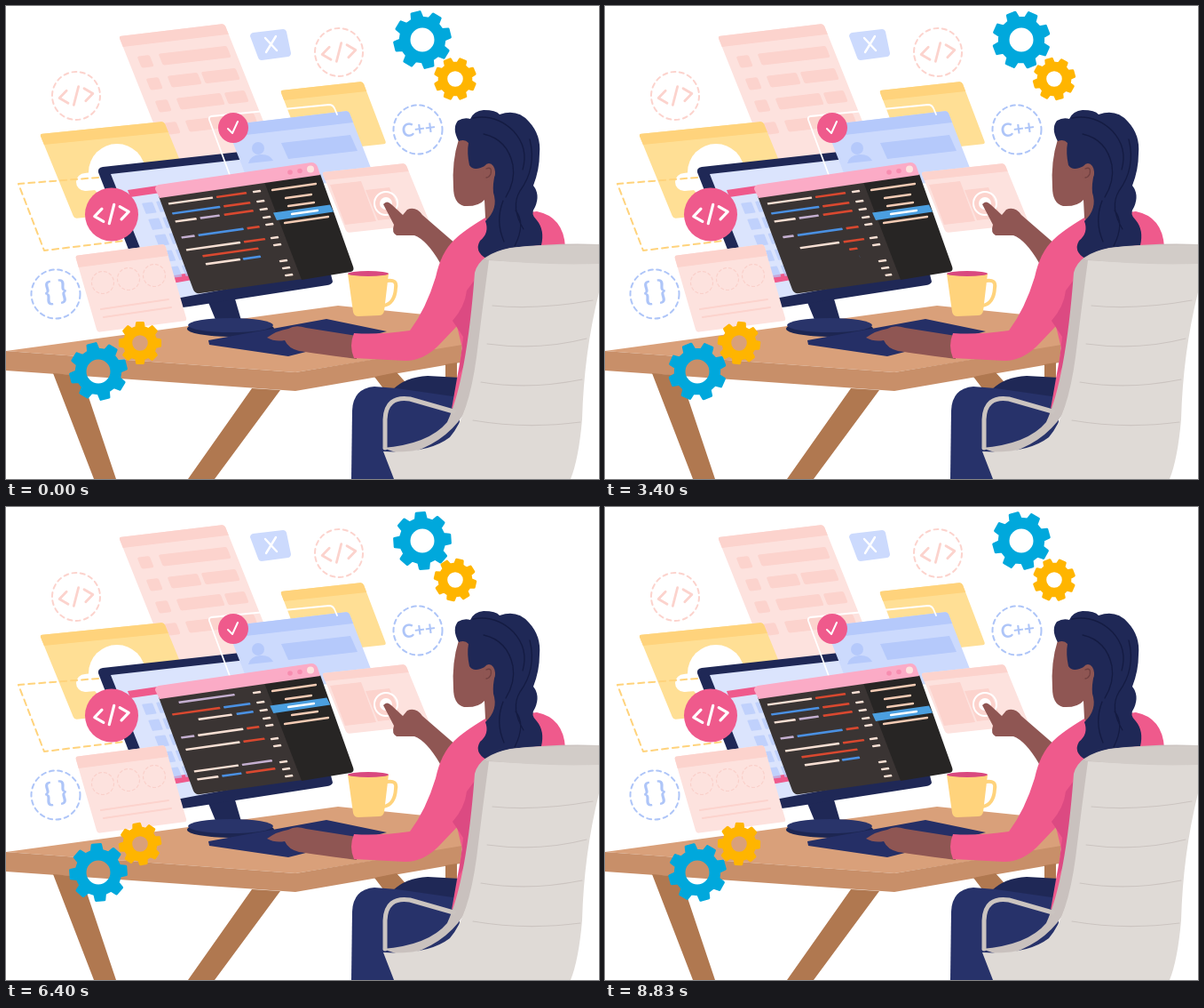
An HTML page with a canvas that plays this animation: 668 px wide and 532 px high, repeating every 8.86 s.

```html
<!DOCTYPE html>
<html lang="en">
<head>
<meta charset="utf-8">
<title>Developer at work</title>
<style>
html, body { margin: 0; width: 100%; height: 100%; overflow: hidden; background: #fff; }
canvas { display: block; width: 668px; height: 532px; }
</style>
</head>
<body>
<canvas id="stage" width="668" height="532"></canvas>
<script>
const W = 668, H = 532, LOOP = 8860, HALF = LOOP / 4;
const navy = '#1f2856', pink = '#ef5a8c', skin = '#8f5653';
const blush = '#fde2de', rose = '#fcd3cd', sky = '#ccdafd', azure = '#b5c9fb';
const butter = '#ffdf95', gold = '#ffd37c', cream = '#f7dfd3', red = '#d9482f', blue = '#4a90e2', lav = '#c4afd0';

const view = document.getElementById('stage').getContext('2d');
const back = document.createElement('canvas');
back.width = W;
back.height = H;
let c = back.getContext('2d');

function fill(color, d) {
  c.fillStyle = color;
  c.fill(new Path2D(d));
}
function line(color, width, d, dash = []) {
  c.strokeStyle = color;
  c.lineWidth = width;
  c.lineCap = c.lineJoin = 'round';
  c.setLineDash(dash);
  c.stroke(new Path2D(d));
  c.setLineDash([]);
}
function disc(color, x, y, r, ry = r) {
  c.fillStyle = color;
  c.beginPath();
  c.ellipse(x, y, r, ry, 0, 0, 7);
  c.fill();
}
function ring(color, x, y, r, width, dash = []) {
  c.strokeStyle = color;
  c.lineWidth = width;
  c.lineCap = 'round';
  c.setLineDash(dash);
  c.beginPath();
  c.arc(x, y, r, 0, Math.PI * 2);
  c.stroke();
  c.setLineDash([]);
}
// Runs a drawing in slanted coordinates with its corner at x, y
function slanted(x, y, rise, lean, draw) {
  c.save();
  c.transform(1, rise, lean, 1, x, y);
  draw();
  c.restore();
}
function box(color, x, y, w, h, r = 0) {
  c.fillStyle = color;
  c.beginPath();
  c.roundRect(x, y, w, h, r);
  c.fill();
}
function pane(x, y, rise, lean, w, h, body, head, headH, inner) {
  slanted(x, y, rise, lean, () => {
    box(body, 0, 0, w, h, 3);
    box(head, 0, 0, w, headH, [3, 3, 0, 0]);
    if (inner) inner();
  });
}
function tag(color, x, y, s, width) {
  c.save();
  c.translate(x, y);
  c.rotate(-0.13);
  c.scale(s, s);
  line(color, width / s, 'M-10-7L-19 0L-10 7M10-7L19 0L10 7M4-10L-4 10');
  c.restore();
}
function label(text, x, y, size, color) {
  c.save();
  c.translate(x, y);
  c.rotate(-0.13);
  c.font = `bold ${size}px Lato, sans-serif`;
  c.textAlign = 'center';
  c.textBaseline = 'middle';
  c.fillStyle = color;
  c.fillText(text, 0, 0);
  c.restore();
}

function drawPanes() {
  pane(127, 34, -0.119, 0.4, 119, 150, blush, rose, 12, () => {
    for (let i = 0; i < 4; i++) {
      const y = 24 + i * 25;
      box(rose, 11, y, 14, 13, 2);
      if (i % 3 === 0) box(rose, 35, y, 77, 13, 2);
      else {
        const w = i === 1 ? 34 : 50;
        box(rose, 35, y, w, 13, 2);
        box(rose, 39 + w, y, 73 - w, 13, 2);
      }
    }
  });
  fill(sky, 'M278 30L312 26Q315 26 316 29L321 53Q321 56 318 57L288 61Q285 61 284 58L275 34Q275 31 278 30Z');
  line('#fff', 2.4, 'M292 36L305 50M304 34L293 52');
  pane(38, 144, -0.1, 0.41, 140, 95, butter, gold, 12);
  disc('#fff', 125, 187, 32);
  disc('#fff', 89, 198, 10);
  fill('#fff', 'M89 188L140 181L152 203L89 208Z');
  line(gold, 2, 'M128 191L14 200L43 275L150 262', [7, 5]);
  pane(309, 95, -0.107, 0.38, 93, 70, butter, gold, 11);
}

function drawMonitor() {
  fill('#d9a07a', 'M0 388L374 337L520 352L514 382L326 412Z');
  fill('#c88f69', 'M0 388L326 412L514 381L512 401L326 433L0 410Z');
  fill('#b07850', 'M53 413L85 416L124 532L99 532ZM277 430L309 432L235 532L205 532ZM415 417L440 412L456 430L428 434ZM495 403L508 401L508 422L495 418Z');
  fill(navy, 'M227 331L257 326L266 357L239 360Z');
  disc('#1d2652', 253, 363, 49, 9);
  disc('#29346a', 253, 359, 48, 8);
  fill(navy, 'M109 181L300 160L366 302L368 310Q367 313 362 314L207 338Q166 344 162 335L104 187Q103 182 109 181Z');
  fill('#dbe4fd', 'M118 189L280 171L345 300L197 328L174 330Z');
  fill(pink, 'M137 207L185 200L188 208L140 215ZM184 304L207 300L210 308L187 312Z');
  c.globalAlpha = 0.7;
  slanted(153, 222, -0.13, 0.4, () => {
    for (let i = 0; i < 5; i++) {
      box(azure, 0, i * 18, 12, 12, 1);
      box(azure, 16, i * 18, 26, 12, 1);
    }
  });
  c.globalAlpha = 1;
  pane(248, 134, -0.116, 0.39, 138, 75, sky, azure, 13);
  disc(azure, 284, 160, 7);
  fill(azure, 'M273 177Q275 168 286 167Q297 166 301 174Z');
  fill(azure, 'M310 154L388 145L396 163L318 172Z');
  line('#fff', 1.8, 'M252 190L229 128Q228 125 231 124L364 111Q368 111 370 115L373 122');
  pane(356, 187, -0.107, 0.41, 94, 68, blush, rose, 9);
  fill(rose, 'M365 201L400 197L417 242L382 246ZM405 207L432 204L446 238L419 241Z');
  ring('#fff', 428, 222, 13, 2);
  disc('#fff', 428, 222, 7);
}

function drawEditor() {
  fill('#3a3433', 'M172 214L292 197L334 307L219 323Q213 324 211 319Z');
  fill('#272524', 'M291 198L354 189L391 293Q393 298 388 299L333 308Z');
  fill('#fbabc6', 'M172 201L344 176Q349 176 351 181L354 190L173 216L168 206Q168 202 172 201Z');
  disc('#f78db0', 320, 187, 2.8);
  disc('#f78db0', 331, 185.5, 2.8);
  disc('#fde3df', 343, 183.5, 4);
}

function drawBadges() {
  for (const [x, y] of [[79, 101], [375, 52]]) {
    ring(rose, x, y, 27, 2, [5, 4.4]);
    tag(rose, x, y, 1, 2.8);
  }
  for (const [x, y] of [[464, 139], [56, 324]]) ring('#aec5f8', x, y, 27.5, 2, [5, 4.4]);
  label('C++', 465, 139, 21, '#aec5f8');
  label('{ }', 56, 322, 30, '#aec5f8');
  disc(pink, 119, 234.5, 30);
  tag('#fff', 119, 234, 1.02, 3.2);
  disc(pink, 256, 137, 17);
  line('#fff', 2, 'M250 138L255 143L261 130');
  pane(78, 281, -0.129, 0.29, 101, 86, blush, rose, 13);
  for (const [x, y] of [[109, 311], [138, 307], [167, 303]]) ring('#fad0ca', x, y, 12.5, 1.2, [3, 3]);
  line(rose, 2, 'M107 341L183 330M110 350L186 339');
}

function drawPerson() {
  fill('#252f66', 'M228 376L361 352L429 366L318 394L229 381Z');
  line(gold, 4, 'M429 309Q441 307 439 317Q438 335 425 337');
  fill(gold, 'M385 301L431 301L426 343Q425 348 420 348L397 349Q392 349 391 344Z');
  disc('#d9487f', 408, 301, 23, 3);
  // arms and face
  fill(skin, 'M425 223Q429 218 434 223L447 235L452 229Q462 225 469 235L506 267L489 289Q474 263 460 258L440 258Q434 255 437 246Z');
  fill(skin, 'M294 373Q305 365 318 363Q326 358 338 362L395 371L395 397Q350 391 330 388Q318 385 314 376Q303 378 294 373Z');
  // legs
  fill(navy, 'M435 432Q450 417 475 416L512 418L506 450L440 445Z');
  fill('#27326a', 'M389 532L390 455Q391 430 415 428L440 430L510 440L512 500L437 532Z');
  // top
  fill(pink, 'M540 238Q515 253 505 263Q490 277 484 305Q473 341 455 365Q420 370 392 368Q386 382 392 396L450 399Q470 399 487 382L508 360L514 385L502 453L520 440L542 284L630 271Q628 237 598 231Z');
  fill('#dc4a82', 'M519 320Q517 338 503 354L515 372L510 415L525 390L534 300Z');
  fill(skin, 'M510 150Q502 175 504 204Q504 222 516 225Q532 226 539 218L540 238Q548 252 558 238L560 170L540 145Z');
  fill(navy, 'M510 152Q502 138 509 129Q516 125 523 127Q527 118 538 117Q552 117 556 122Q576 115 589 130Q603 145 601 166Q601 184 594 202Q602 212 596 226Q590 234 598 241Q607 252 603 269L566 273L541 284Q527 276 534 264Q545 255 540 242Q555 228 549 210Q548 201 551 188Q549 177 541 179Q527 187 522 179Q519 165 521 154Q517 149 510 152Z');
  disc(skin, 544, 187, 7, 10);
  line('#6f3f40', 1.3, 'M541 183Q548 180 546 189Q544 193 541 193');
  line('#141b42', 1.3, 'M526 126Q552 121 572 141Q589 160 582 184M538 144Q565 150 571 179Q574 197 563 215M590 150Q598 182 579 208Q568 226 583 251M560 219Q551 242 561 265M574 230Q586 244 573 270');
}

function drawChair() {
  fill('#c9c1be', 'M528 300Q533 279 568 272Q620 266 668 268L668 300L548 310Q536 410 515 460Q493 493 448 505L424 497Q476 493 497 468Q519 420 528 300Z');
  fill('#dfdad6', 'M544 286Q600 290 668 287L668 322Q651 390 649 465Q645 510 636 532L437 532L425 501Q475 504 500 485Q521 461 530 395Q538 330 544 286Z');
  fill('#d2ccc8', 'M540 285Q553 271 595 270L668 268L668 290Q600 292 540 285Z');
  line('#cbc4c0', 1.2, 'M548 337Q600 342 661 331M542 380Q600 388 654 374M535 423Q590 432 649 420M526 466Q585 476 647 468');
  line('#cbc4c0', 5, 'M504 456L455 442Q428 438 427 465L427 497');
}

// Each row: depth, extra delay, then colour, left and right of its parts, rightmost part first
const rowsA = [
  [0, 0, red, 54, 88, cream, 0, 50],
  [11, 0, red, 58, 88, blue, 0, 54],
  [20, 0, red, 55, 88, lav, 28, 50, cream, 0, 24],
  [38, 0, red, 74, 88, blue, 19, 70, lav, 0, 15],
  [52, 0, red, 65, 89, cream, 0, 61],
  [61, 110, red, 15, 78],
  [70, 110, blue, 57, 77, cream, 15, 54]
];
const rowsB = [
  [-1, 0, lav, 12, 75],
  [11, 0, blue, 58, 88, red, 0, 54],
  [20, 0, blue, 69, 88, cream, 26, 64],
  [37, 0, red, 74, 88, cream, 19, 70, lav, 0, 15],
  [50.5, 0, red, 65, 89, cream, 0, 61],
  [75, 0, lav, 54, 88, cream, 0, 50],
  [84, 0, red, 55, 88, blue, 28, 50, cream, 0, 24]
];
const marks = [0, 11, 20, 29, 37, 52, 60, 78, 86, 94];

const clamp = x => Math.max(0, Math.min(1, x));
const ease = x => (1 - Math.cos(Math.PI * clamp(x))) / 2;

// Parts grow from their right end to the left
function dash(color, l, r, v, p) {
  if (p > 0) box(color, r - (r - l) * p, v - 1.2, (r - l) * p, 2.4, 0.6);
}
function drawCode(rows, shift, s) {
  for (const v of marks) dash(cream, 95, 104, v + shift, clamp((s - 250 - v * 5.5) / 90));
  for (const [v, lag, ...parts] of rows) {
    for (let i = 0; i < parts.length; i += 3) {
      const start = 334 + v * 5.5 + lag + i * 20;
      dash(parts[i], parts[i + 1], parts[i + 2], v + shift, ease((s - start) / 250));
    }
  }
}

function drawScreen(t) {
  const q = (t - 340 + LOOP) % (HALF * 2);
  const toB = q < HALF, s = q % HALF;
  const gap = 115, scroll = ease(s / 600) * gap;
  c.save();
  c.clip(new Path2D('M173 216L292 198L334 307L214 323Z'));
  slanted(183, 222.5, -0.14, 0.385, () => {
    if (s < 600) drawCode(toB ? rowsA : rowsB, -scroll, HALF * 2);
    drawCode(toB ? rowsB : rowsA, gap - scroll, s);
  });
  c.restore();

  const up = toB ? ease(s / 300) : 1 - ease(s / 300);
  c.save();
  c.translate(-3.7 * up, -9 * up);
  fill('#4b9fe0', 'M301 232.5L365 223.5L369 231.5L305 241Z');
  c.restore();
  line('#f3cbb4', 2.3, 'M300 207L349 200M315 216L344 212M314 244L363 237');
  line(up > 0.5 ? '#fff' : '#f3cbb4', 2.3, 'M318 225L347 221');
  line(up > 0.5 ? '#f3cbb4' : '#fff', 2.3, 'M322 234L351 230');
}

function gear(color, x, y, r, hole, turn) {
  const p = new Path2D(), teeth = 8, pitch = Math.PI * 2 / teeth;
  for (let i = 0; i < teeth; i++) {
    for (const [k, d] of [[-0.3, 0.79], [-0.19, 1], [0.19, 1], [0.3, 0.79]]) {
      const a = turn + (i + k) * pitch, m = (r - 1.5) * d;
      p.lineTo(x + Math.cos(a) * m, y + Math.sin(a) * m);
    }
  }
  p.closePath();
  const solid = new Path2D(p);
  solid.moveTo(x + hole, y);
  solid.arc(x, y, hole, 0, Math.PI * 2);
  c.fillStyle = c.strokeStyle = color;
  c.lineWidth = 3;
  c.lineJoin = 'round';
  c.fill(solid, 'evenodd');
  c.stroke(p);
}
function drawGears(t) {
  const a = t / LOOP * Math.PI * 2.5;
  for (const [x, y, x2, y2, start] of [[469, 38, 506, 82, 0.39], [104, 411, 151, 379, 0]]) {
    gear('#00a8dc', x, y, 33, 13.5, a - 0.24);
    gear('#ffb500', x2, y2, 24.3, 8.8, start - a);
  }
}

drawPanes();
drawMonitor();
drawEditor();
drawBadges();
drawPerson();
drawChair();
c = view;

function frame(now) {
  const step = LOOP / 266;
  const t = Math.floor((now % LOOP) / step) * step;
  c.fillStyle = '#fff';
  c.fillRect(0, 0, W, H);
  c.drawImage(back, 0, 0);
  drawScreen(t);
  drawGears(t);
}
const begin = performance.now();
function tick() {
  frame(performance.now() - begin);
  requestAnimationFrame(tick);
}
tick();
</script>
</body>
</html>
```
